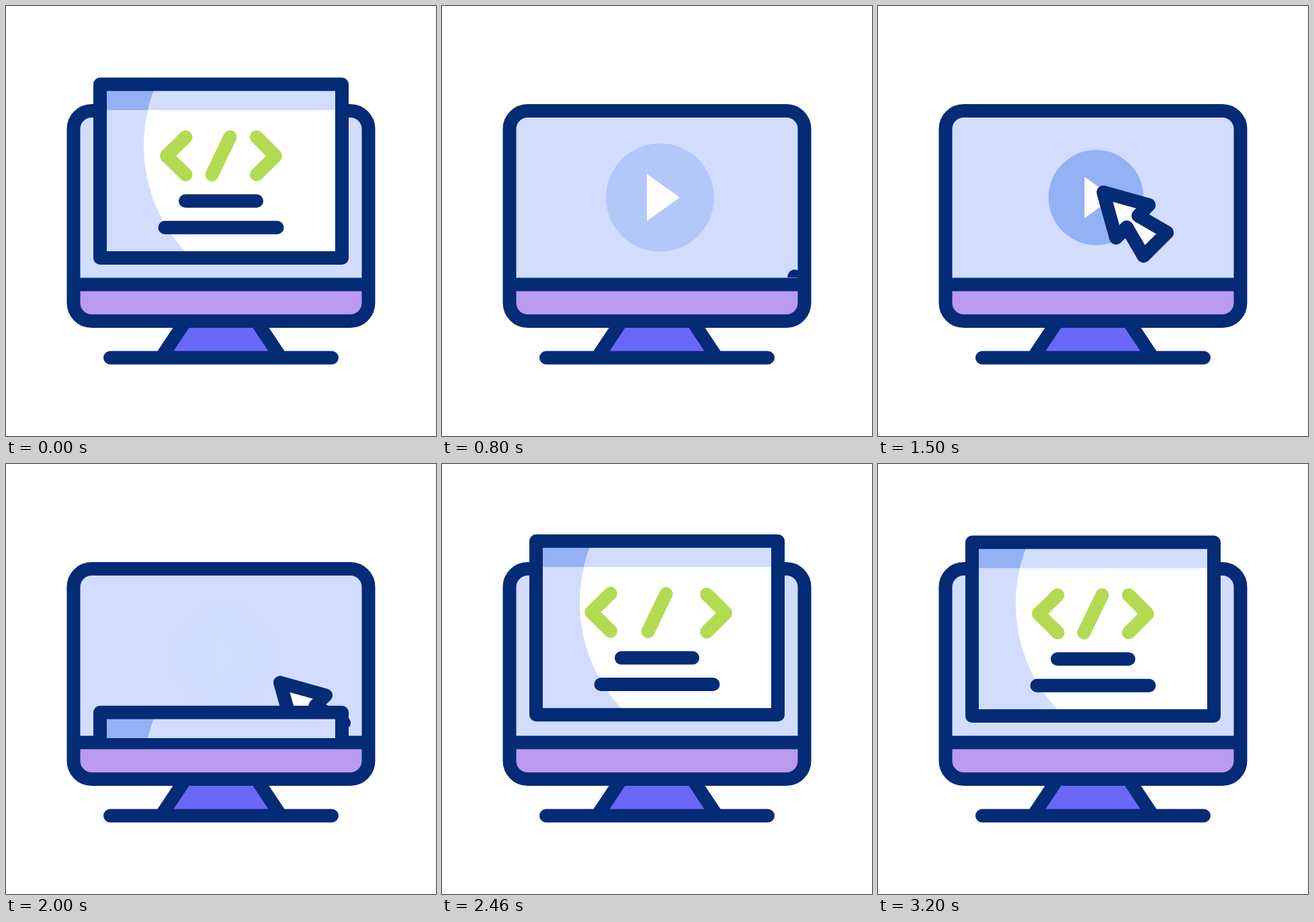
An HTML page that plays this animation: 640 px wide and 640 px high, repeating every 3.4 s.

```html
<!DOCTYPE html>
<html lang="en">
<head>
<meta charset="utf-8">
<title>Coding monitor</title>
<style>
html, body { margin: 0; width: 100%; height: 100%; overflow: hidden; background: #fff; }
svg { display: block; width: 100vw; height: 100vh; }
.line { fill: none; stroke: #042b76; stroke-width: 20; stroke-linecap: round; stroke-linejoin: round; }
.code { stroke: #b2db51; }
.ray { stroke: #33cccc; }
.pale { fill: #d2ddfd; }
.blue { fill: #95b1f5; }
</style>
</head>
<body>
<svg viewBox="0 0 640 640">
  <defs>
    <clipPath id="screen"><rect x="105" y="160" width="430" height="244"/></clipPath>
    <clipPath id="aboveChin"><rect width="640" height="408"/></clipPath>
    <clipPath id="pane"><rect x="145" y="120" width="350" height="250"/></clipPath>
  </defs>

  <!-- monitor -->
  <path d="M260 470L237 515H403L380 470Z" fill="#6a67f8"/>
  <path class="line" d="M267.5 468.5L233.5 519.5M372.5 468.5L406.5 519.5M155 523.5H485"/>
  <rect class="pale" x="100.5" y="156" width="439" height="313" rx="27"/>
  <path d="M101 415H539V442A27 27 0 0 1 512 469H128A27 27 0 0 1 101 442Z" fill="#bb9af1"/>

  <g clip-path="url(#screen)">
    <g id="play">
      <circle id="disc" class="blue" r="80.5"/>
      <path id="tri" d="M-19.5 -35L29.5 0L-19.5 35Z" fill="#fff"/>
    </g>
    <path id="cursor" class="line" style="fill:#fff" d="M0 0L68 19L52 35L95 60L60 95L35 52L19 68Z"/>
  </g>
  <path class="line" d="M101 414.5H539"/>
  <rect class="line" x="100.5" y="156" width="439" height="313" rx="27"/>

  <!-- code window -->
  <g clip-path="url(#aboveChin)">
    <g id="win">
      <g clip-path="url(#pane)">
        <rect class="pale" x="140" y="116" width="360" height="260"/>
        <rect class="blue" x="140" y="116" width="120" height="39"/>
        <circle cx="436" cy="208" r="231" fill="#fff"/>
        <path class="pale" d="M220 126H495V155H211.500Q214.500 140 220 126Z"/>
      </g>
      <rect class="line" x="140" y="116.500" width="360" height="258.500"/>
      <path id="left" class="line code" d="M267.500 195L239 223L267.500 251"/>
      <path class="line code" d="M333.500 195L306.500 251"/>
      <path id="right" class="line code" d="M373 195L401 223L373 251"/>
      <path class="line" d="M267 290.300H373M236.500 329.700H403.500"/>
    </g>
  </g>

  <path id="rays" class="line ray"/>
</svg>
<script>
const LOOP = 3400;
const $ = id => document.getElementById(id);
const move = (id, x, y, s = 1) =>
  $(id).setAttribute('transform', `translate(${x} ${y}) scale(${s})`);

// Smooth progress 0..1 between two times
function ease(t, from, to) {
  const p = Math.min(1, Math.max(0, (t - from) / (to - from)));
  return p * p * (3 - 2 * p);
}

function rayPath(t) {
  const head = 75 * ease(t, 2470, 2780), tail = 75 * ease(t, 2720, 3120);
  if (head - tail < 0.5) return '';
  return [[289.5, 96, -0.71, -0.71], [318.5, 95, 0, -1], [348, 96, 0.71, -0.71]]
    .map(([x, y, dx, dy]) =>
      `M${x + dx * tail} ${y + dy * tail}L${x + dx * head} ${y + dy * head}`)
    .join('');
}

function draw(t) {
  const drop = t < 1800
    ? 306 * ease(t, 0, 600)
    : 306 - 334.5 * ease(t, 1800, 2600) + 28.5 * ease(t, 2600, 3200);
  move('win', 0, drop);

  const spread = ease(t, 2160, 2680) - ease(t, 2680, 3200);
  move('left', -27 * spread, -spread);
  move('right', 34 * spread, spread);

  const press = ease(t, 1380, 1520) - ease(t, 1520, 1640);
  move('play', 324.5, 285, 1 - 0.127 * press);
  const fadeOut = ease(t, 1640, 2040);
  $('disc').setAttribute('opacity', ease(t, 600, 1000) - fadeOut);
  $('tri').setAttribute('opacity', ease(t, 600, 800) - fadeOut);

  const away = 1.12 * (1 - ease(t, 620, 1520) + ease(t, 1640, 2554));
  move('cursor', 335 + 189 * away, 277 + 125 * away);

  $('rays').setAttribute('d', rayPath(t));
}

const start = performance.now();
function tick() {
  draw((performance.now() - start) % LOOP);
  requestAnimationFrame(tick);
}
tick();
</script>
</body>
</html>
```
